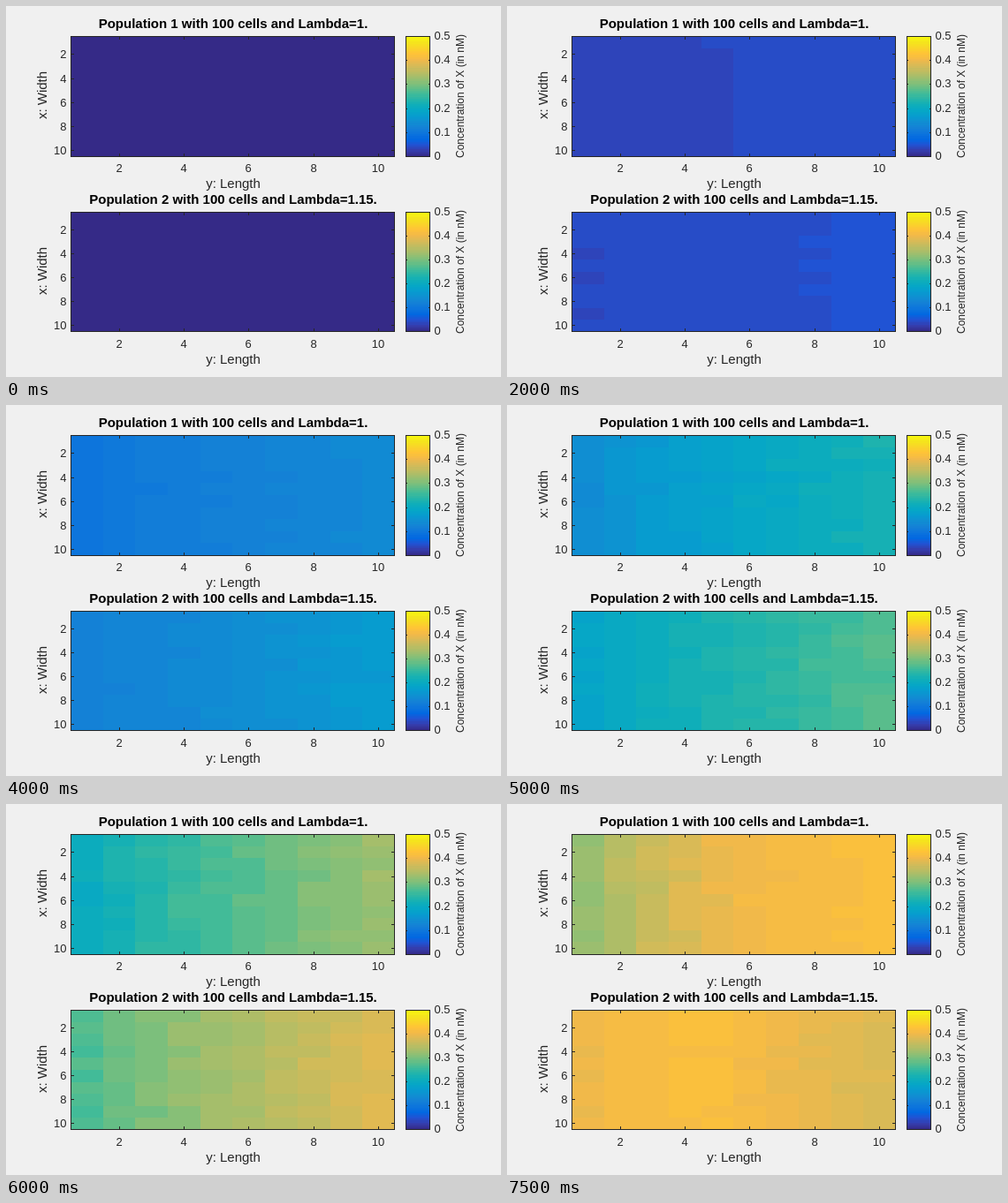
Write an HTML page that moves like this. It is 560 px wide and 420 px high and loops after 8 s.

```html
<!DOCTYPE html>
<html lang="en">
<head>
<meta charset="utf-8">
<title>Two cell populations</title>
<style>
  html, body { margin: 0; width: 100%; height: 100%; overflow: hidden; background: #f0f0f0; }
  svg { display: block; font: 13px "Liberation Sans", Arial, sans-serif; fill: #262626; }
  rect, path { shape-rendering: crispEdges; }
  .axis { fill: none; stroke: #262626; stroke-width: 1; }
  .title { font-size: 15px; font-weight: bold; fill: #000; }
  .label { font-size: 15px; }
  .small { font-size: 12px; }
  .mid { text-anchor: middle; }
  .end { text-anchor: end; }
</style>
</head>
<body>
<svg id="stage" width="560" height="420" viewBox="0 0 560 420"></svg>
<script>
const LOOP = 8000, STEP = 500, FIRST_CHANGE = 1500;
const LEFT = 73, RIGHT = 439, HEIGHT = 136, COUNT = 10;
const BAR_LEFT = 452, BAR_WIDTH = 28, LEVELS = 64;
const NS = 'http://www.w3.org/2000/svg';
const stage = document.getElementById('stage');

// The parula colour map at evenly spaced stops.
const STOPS = ('352a87 353dad 2053d4 0268e1 0d75dc 1481d6 108ed2 079ccf 06a7c6 0faeb9 25b5a9 ' +
  '42bb98 65be86 87bf77 a5be6b c0bc60 d9ba56 f1b94a ffc337 fad32a f5e41d f9fb0e').split(' ')
  .map(hex => [0, 2, 4].map(i => parseInt(hex.slice(i, i + 2), 16)));

// Colour level reached by a cell of unit speed at a given age.
const GROWTH = [[0, 0], [1, 2.51], [4, 10.2], [6, 17], [8, 28], [10, 41], [11.6, 51], [13, 53], [14.6, 48]];

// Cells speed up from slow (left) to fast (right).
const POPULATIONS = [
  { title: 'Population 1 with 100 cells and Lambda=1.', top: 34, bottom: 170, slow: .75, fast: 1, seed: 7 },
  { title: 'Population 2 with 100 cells and Lambda=1.15.', top: 233, bottom: 368, slow: .88, fast: 1.12, seed: 23 }
];

const mix = (a, b, f) => a + (b - a) * f;

function growth(age) {
  const last = GROWTH.length - 1;
  const next = GROWTH.findIndex(point => point[0] > age);
  const i = next < 0 ? last : next;
  const [x0, y0] = GROWTH[i - 1], [x1, y1] = GROWTH[i];
  return mix(y0, y1, (age - x0) / (x1 - x0));
}

function seeded(seed) {
  let state = seed * 7919;
  return () => (state = (state * 16807) % 2147483647) / 2147483647;
}

const PALETTE = Array.from({ length: LEVELS }, (_, i) => {
  const k = Math.min(Math.floor(i / 3), STOPS.length - 2);
  const rgb = STOPS[k].map((v, j) => Math.round(mix(v, STOPS[k + 1][j], i / 3 - k)));
  return `rgb(${rgb})`;
});

function add(tag, attrs, text) {
  const node = document.createElementNS(NS, tag);
  for (const name in attrs) node.setAttribute(name, attrs[name]);
  if (text) node.textContent = text;
  stage.append(node);
  return node;
}

const write = (text, x, y, style = '') => add('text', { x, y, class: style }, text);

function writeUp(text, x, y, style) {
  add('text', { transform: `translate(${x} ${y}) rotate(-90)`, class: 'mid ' + style }, text);
}

function block(x0, y0, x1, y1, fill) {
  return add('rect', { x: x0, y: y0, width: x1 - x0, height: y1 - y0, fill });
}

function frame(x, y, width, height) {
  add('rect', { x: x + .5, y: y + .5, width, height, class: 'axis' });
}

function buildCells({ top, bottom, slow, fast, seed }) {
  const random = seeded(seed);
  const edgeX = c => Math.ceil(LEFT - .55 + 36.7 * c);
  const edgeY = r => Math.min(bottom, Math.round(top + HEIGHT * r / COUNT));
  const cells = [];
  for (let r = 0; r < COUNT; r++) {
    for (let c = 0; c < COUNT; c++) {
      const lead = .06 + .94 * (c / (COUNT - 1)) ** .85 + (random() - .5) * .12;
      const node = block(edgeX(c), edgeY(r), edgeX(c + 1), edgeY(r + 1), PALETTE[0]);
      cells.push({ node, speed: mix(slow, fast, lead) });
    }
  }
  return cells;
}

function buildAxes({ top, bottom, title }) {
  frame(LEFT, top, RIGHT - LEFT, bottom - top);
  let ticks = '';
  for (let n = 2; n <= COUNT; n += 2) {
    const part = (n - .5) / COUNT;
    const x = Math.floor(mix(LEFT, RIGHT, part) + .5) + .5;
    const y = Math.floor(mix(top, bottom, part) + .5) + .5;
    ticks += `M${x} ${top}v4M${x} ${bottom + 1}v-4M${LEFT} ${y}h4M${RIGHT + 1} ${y}h-4`;
    write(n, x - .5, top + 154, 'mid');
    write(n, 68.5, y + 4.5, 'end');
  }
  add('path', { d: ticks, class: 'axis' });
  write(title, 257, top - 9, 'mid title');
  write('y: Length', 257, top + 172, 'mid label');
  writeUp('x: Width', 45.5, top + 67, 'label');
}

function buildBar({ top, bottom }) {
  const edge = i => Math.round(mix(bottom + 1, top, i / LEVELS));
  PALETTE.forEach((fill, i) => block(BAR_LEFT, edge(i + 1), BAR_LEFT + BAR_WIDTH, edge(i), fill));
  frame(BAR_LEFT, top, BAR_WIDTH - 1, bottom - top);
  let ticks = '';
  for (let i = 0; i <= 5; i++) {
    const y = Math.round(mix(bottom, top, i / 5));
    ticks += `M${BAR_LEFT} ${y + .5}h2M${BAR_LEFT + BAR_WIDTH} ${y + .5}h-2`;
    write(String(i / 10), 484.5, y + 4);
  }
  add('path', { d: ticks, class: 'axis' });
  writeUp('Concentration of X (in nM)', 518, top + 68, 'small');
}

function paint(time) {
  const age = time < FIRST_CHANGE ? 0 : (time - FIRST_CHANGE) / STEP + 1;
  for (const { cells } of POPULATIONS) {
    for (const { node, speed } of cells) {
      node.setAttribute('fill', PALETTE[Math.round(growth(age * speed))]);
    }
  }
}

for (const pop of POPULATIONS) {
  pop.cells = buildCells(pop);
  buildAxes(pop);
  buildBar(pop);
}

const start = performance.now();
let shown = -1;
function tick() {
  const time = Math.floor((performance.now() - start) % LOOP / STEP) * STEP;
  if (time !== shown) paint(shown = time);
  requestAnimationFrame(tick);
}
tick();
</script>
</body>
</html>
```
